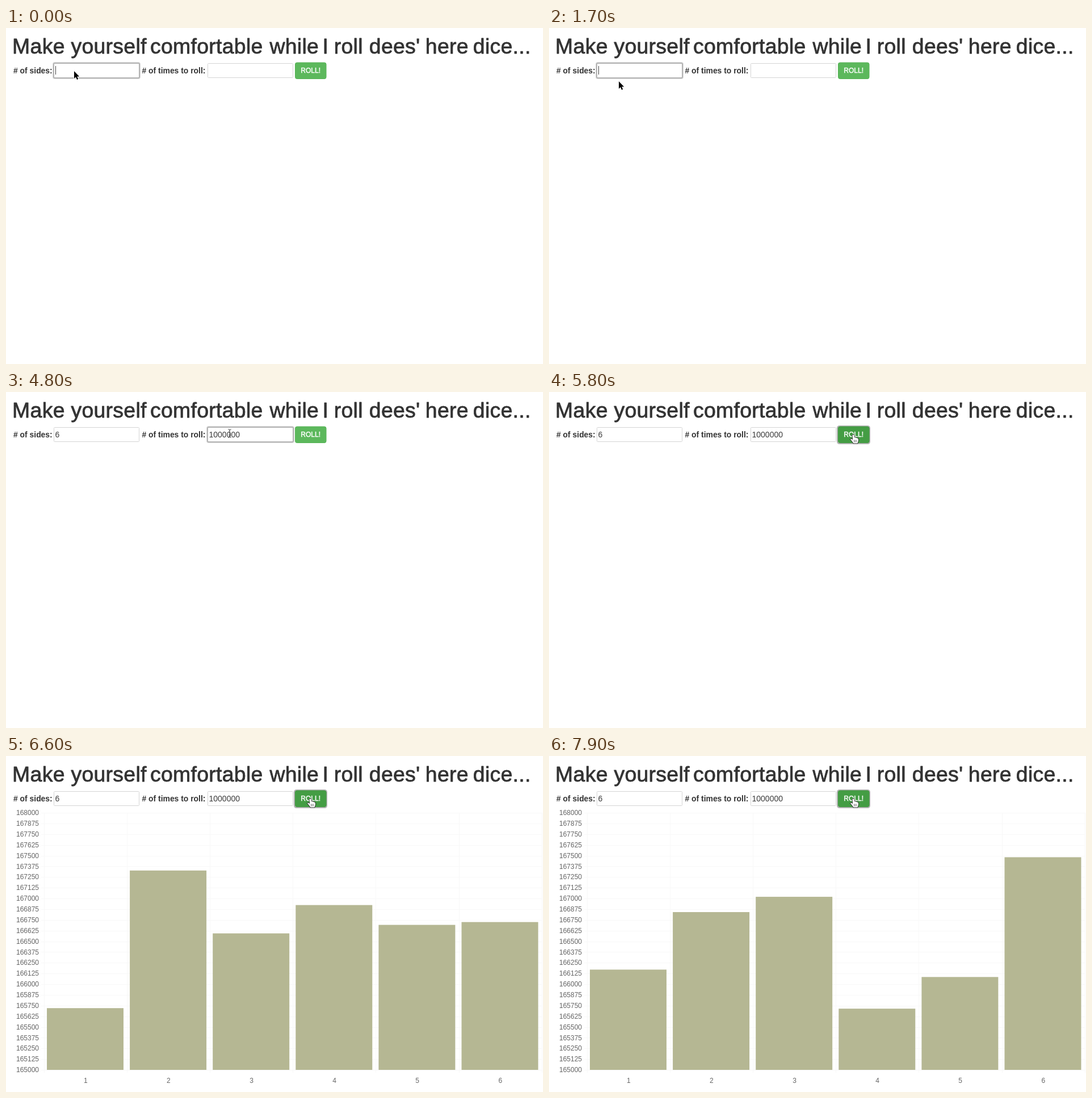
Recreate the animation shown at these times as an HTML page with a canvas. Size 946 by 592 pixels, loop 8 s.

```html
<!DOCTYPE html>
<html lang="en">
<head>
<meta charset="utf-8">
<title>Dice roller</title>
<style>
  html, body { margin: 0; width: 100%; height: 100%; overflow: hidden; background: #fff; }
  canvas { display: block; }
</style>
</head>
<body>
<canvas id="stage" width="946" height="592"></canvas>
<script>
const ctx = document.getElementById('stage').getContext('2d');
const LOOP = 8000, STEP = 100;
const SANS = '"Liberation Sans", Arial, sans-serif';

const HEADING = [['Make', 11.1], ['yourself', 114.4], ['comfortable', 254], ['while', 464.4],
  ['I', 557.6], ['roll', 577.7], ["dees'", 639.8], ['here', 738.8], ['dice...', 822.8]];

// Each roll: start time and final bar heights in pixels
const ROLLS = [
  { start: 5815, bars: [109, 352, 241, 291, 256, 261] },
  { start: 7415, bars: [190, 299, 328, 116, 176, 403] }
];
const CHART = { left: 67, top: 100, bottom: 553, slot: 146.1, rows: 24 };

const TYPE_SIDES = 1900, TAB = 2300, TYPE_ONE = 2700, TYPE_ZEROS = 2900, CLICK = 5700;

const clamp = v => Math.max(0, Math.min(1, v));
const between = (t, a, b) => t >= a && t < b;
const smooth = v => v * v * (3 - 2 * v);
const outQuart = v => 1 - Math.pow(1 - clamp(v), 4);

function text(str, x, y, font, color, align = 'left', weight = 0) {
  ctx.font = font + ' ' + SANS;
  ctx.fillStyle = ctx.strokeStyle = color;
  ctx.textAlign = align;
  ctx.fillText(str, x, y);
  if (weight) {
    ctx.lineJoin = 'round';
    ctx.lineWidth = weight;
    ctx.strokeText(str, x, y);
  }
}

function box(x, y, w, h, r, fill, stroke, line = 1) {
  ctx.beginPath();
  ctx.roundRect(x, y, w, h, r);
  if (fill) { ctx.fillStyle = fill; ctx.fill(); }
  if (stroke) { ctx.strokeStyle = stroke; ctx.lineWidth = line; ctx.stroke(); }
}

function shape(points, x, y, fill, stroke, line) {
  ctx.beginPath();
  points.forEach(([px, py]) => ctx.lineTo(x + px, y + py));
  ctx.closePath();
  ctx.lineJoin = 'round';
  ctx.strokeStyle = stroke;
  ctx.lineWidth = line;
  ctx.stroke();
  ctx.fillStyle = fill;
  ctx.fill();
}

function heading() {
  ctx.letterSpacing = '0.3px';
  for (const [word, x] of HEADING) text(word, x, 45, '37.4px', '#333', 'left', 0.8);
  ctx.letterSpacing = '0px';
}

function field(x, value, focused, caret) {
  if (focused) {
    box(x, 62, 151, 26, 2, '#fff', '#dcdcdc', 4);
    box(x, 62, 151, 26, 2, '#fff', '#b4b4b4', 2);
  } else {
    box(x + 0.5, 62.5, 150, 25, 1, '#fff', '#d4d4d4');
  }
  text(value, x + 2.5, 79.5, '14px', '#3c3c3c');
  if (caret) {
    const cx = Math.round(x + 3 + ctx.measureText(value).width);
    ctx.fillStyle = '#444';
    ctx.fillRect(cx, 67, 1, 15);
  }
}

function button(hover, focused) {
  if (focused) box(508.5, 60.5, 56, 30, 3, null, '#b4b4b4', 3);
  box(509.5, 61, 54.5, 28.5, 3, hover ? '#449d44' : '#5cb85c', hover ? '#3f983f' : '#57b457');
  text('ROLL!', 536.7, 79.2, '12px', '#fff', 'center', 0.45);
}

function chart(t) {
  const roll = ROLLS.filter(r => t >= r.start).pop();
  if (!roll) return;
  const { left, top, bottom, slot, rows } = CHART;
  const right = left + slot * 6;
  for (let i = 0; i <= rows; i++) {
    const y = bottom - i * (bottom - top) / rows;
    ctx.fillStyle = '#f8f8f8';
    ctx.fillRect(62, Math.round(y), right - 62, 1);
    text(String(165000 + i * 125), 58, y + 4.2, '12px', '#666', 'right');
  }
  ctx.fillStyle = '#f8f8f8';
  for (let i = 0; i <= 6; i++) ctx.fillRect(Math.round(left + i * slot), top, 1, bottom + 5 - top);

  const grow = outQuart((t - roll.start) / 1000);
  roll.bars.forEach((full, i) => {
    const x = left + i * slot + 5, h = full * grow;
    ctx.fillStyle = '#b5b793';
    ctx.fillRect(x, bottom - h, 135, h);
    text(String(i + 1), x + 68.3, 576.2, '12px', '#666', 'center');
  });
}

function arrow(x, y) {
  const tip = [[0, 0], [0, 13], [3, 10.3], [5, 15], [7.2, 14], [5.2, 9.4], [9.2, 9.4]];
  shape(tip, x, y, '#000', '#fff', 2);
}

function beam(x, y) {
  ctx.strokeStyle = '#333';
  ctx.lineWidth = 1;
  ctx.beginPath();
  for (const s of [-1, 1]) {
    ctx.moveTo(x, y);
    ctx.lineTo(x, y + s * 6);
    ctx.lineTo(x - 2.5, y + s * 7.5);
    ctx.moveTo(x, y + s * 6);
    ctx.lineTo(x + 2.5, y + s * 7.5);
  }
  ctx.moveTo(x - 1.5, y + 3);
  ctx.lineTo(x + 1.5, y + 3);
  ctx.stroke();
}

function hand(x, y) {
  const outline = [[-1.5, 1], [0, 0], [1.5, 1], [2, 5], [4, 4.8], [5, 6], [7, 5.8], [7.8, 7],
    [9, 7.5], [9, 11], [7.5, 15.5], [0.5, 15.5], [-2, 12], [-5, 8.5], [-4, 7.3], [-1, 9]];
  shape(outline, x, y, '#fff', '#222', 1.6);
  ctx.fillStyle = '#555';
  for (let i = 0; i < 3; i++) ctx.fillRect(x + 1 + i * 2.2, y + 9.5, 0.8, 4);
}

function pointer(t) {
  if (t < TYPE_SIDES) {
    const p = smooth(clamp((t - 1000) / 700));
    arrow(120 + 3 * p, 76 + 18 * p);
  } else if (t >= 3900) {
    const p = smooth(clamp((t - 4900) / 600));
    const x = 394 + 142 * p, y = 73 + 2 * p;
    if (x < 505) beam(x, y);
    else if (x < 509) arrow(x, y);
    else hand(x, y);
  }
}

function caretOn(t) {
  if (t < TYPE_SIDES) return !between(t, 200, 700) && !between(t, 1200, 1700);
  return !between(t, 3500, 4100) && !between(t, 4600, 5100);
}

function draw(t) {
  ctx.fillStyle = '#fff';
  ctx.fillRect(0, 0, 946, 592);
  heading();
  text('# of sides:', 13, 79.5, 'bold 13.9px', '#333');
  text('# of times to roll:', 239.5, 79.5, 'bold 13.9px', '#333');

  const zeros = Math.max(0, Math.min(6, Math.floor((t - TYPE_ZEROS) / 100) + 1));
  const times = t < TYPE_ONE ? '' : '1' + '0'.repeat(zeros);
  const first = t < TAB, second = between(t, TAB, CLICK);
  const caret = caretOn(t);
  field(84, t < TYPE_SIDES ? '' : '6', first, first && caret);
  field(355, times, second, second && caret);
  button(t >= 5400, t >= CLICK);
  chart(t);
  pointer(t);
}

const begin = performance.now();
function tick() {
  const t = (performance.now() - begin) % LOOP;
  draw(Math.floor(t / STEP) * STEP);
  requestAnimationFrame(tick);
}
tick();
</script>
</body>
</html>
```
